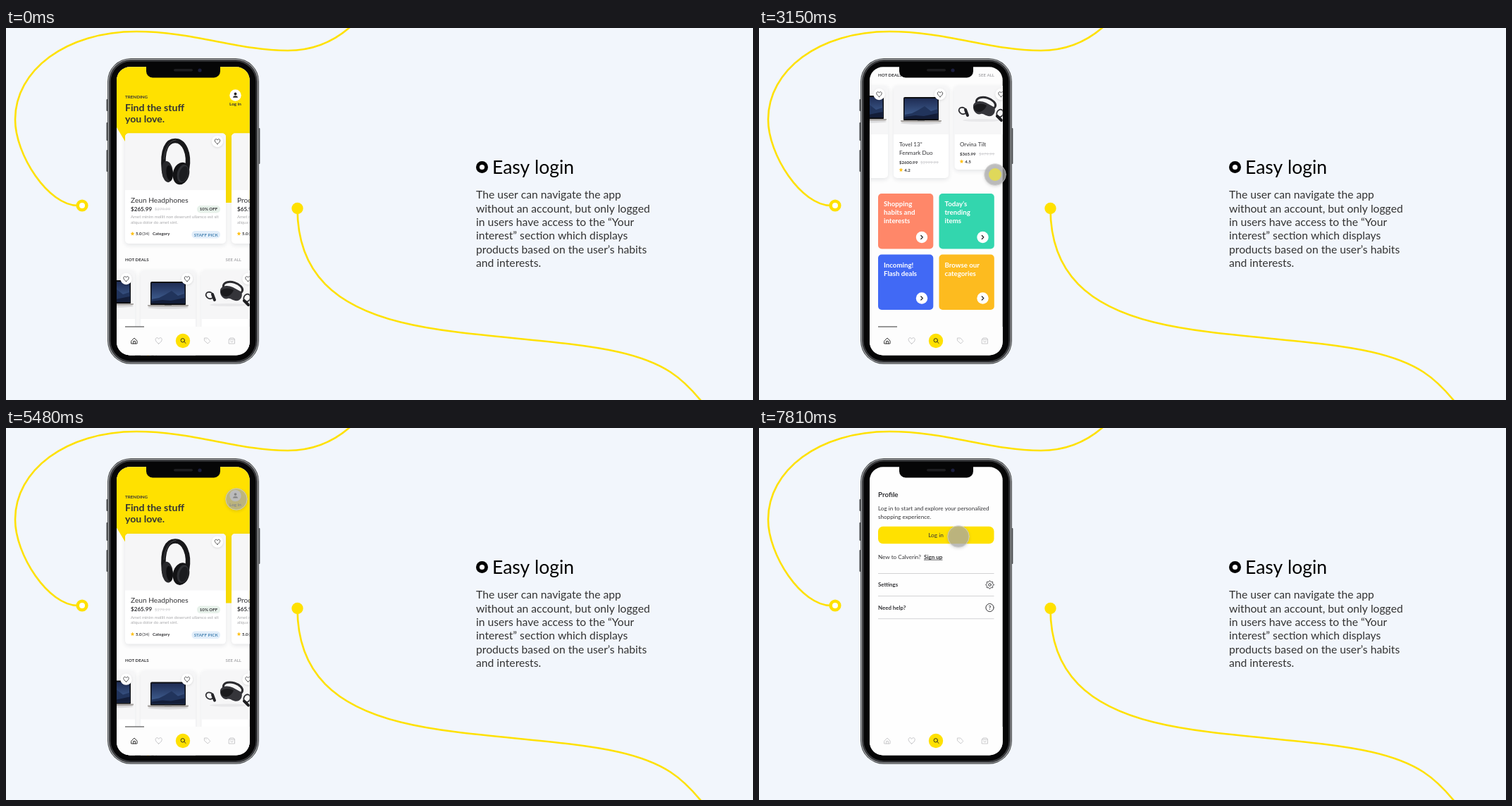
Write an HTML page with a canvas that moves like this. It is 1060 px wide and 528 px high and loops after 8000 ms.

```html
<!DOCTYPE html>
<html lang="en">
<head>
<meta charset="utf-8">
<title>Easy login</title>
<style>
  html, body { margin: 0; width: 1060px; height: 528px; overflow: hidden; background: #f2f6fc; }
  canvas { display: block; width: 1060px; height: 528px; }
</style>
</head>
<body>
<canvas id="stage"></canvas>
<script>
const canvas = document.getElementById('stage');
const ctx = canvas.getContext('2d');
const ratio = window.devicePixelRatio || 1;
canvas.width = 1060 * ratio;
canvas.height = 528 * ratio;

const LOOP = 8000, STEP = 77.5, FIRST_STEP = 830;
const SCROLL_END = 262;
const YELLOW = '#ffe100', INK = '#333336', GREY = '#a9a9ac';

const ICONS = {
  home: 'M-4 0L0-4L4 0V4H-4ZM-1.4 4V.5H1.4V4',
  heart: 'M0 3.8C-6.5-.5-4-4.4-1.8-3.9C-.7-3.7 0-2.6 0-2.3C0-2.6 .7-3.7 1.8-3.9C4-4.4 6.5-.5 0 3.8Z',
  tag: 'M-4-4H0L4 .5L.5 4L-4 0ZM-2-2h.2',
  bag: 'M-4-2L-2.5-4H2.5L4-2V4H-4ZM-4-2H4M-1.7 0A1.7 1.7 0 0 0 1.7 0',
  search: 'M2-.7A2.7 2.7 0 1 1-3.4-.7A2.7 2.7 0 1 1 2-.7M1.3 1.2L3.6 3.5',
  chevron: 'M-1.2-2.5L1.3 0L-1.2 2.5'
};

// ---------- helpers ----------
const clamp = v => Math.min(1, Math.max(0, v));
const lerp = (a, b, p) => a + (b - a) * p;
const inOut = p => p < 0.5 ? 4 * p ** 3 : 1 - 4 * (1 - p) ** 3;
const out = p => 1 - (1 - p) ** 3;
const progress = (t, from, to) => clamp((t - from) / (to - from));

function text(str, x, y, size, color = INK, weight = 400, align = 'left') {
  ctx.font = `${weight} ${size}px Lato, sans-serif`;
  ctx.fillStyle = color;
  ctx.textAlign = align;
  ctx.fillText(str, x, y);
  return ctx.measureText(str).width;
}
const bold = (str, x, y, size, color, align) => text(str, x, y, size, color, 700, align);

function struck(str, x, y, size) {
  const width = text(str, x, y, size, '#cfcfd2');
  box(x, y - size * 0.36, width, 0.6, 0, '#cfcfd2');
}
function box(x, y, w, h, r, fill) {
  ctx.beginPath();
  ctx.roundRect(x, y, w, h, r);
  ctx.fillStyle = fill;
  ctx.fill();
}
function oval(x, y, rx, ry, turn, fill) {
  ctx.beginPath();
  ctx.ellipse(x, y, rx, ry, turn, 0, Math.PI * 2);
  ctx.fillStyle = fill;
  ctx.fill();
}
const disc = (x, y, r, fill) => oval(x, y, r, r, 0, fill);
function ring(x, y, rx, ry, turn, color, width) {
  ctx.beginPath();
  ctx.ellipse(x, y, rx, ry, turn, 0, Math.PI * 2);
  ctx.strokeStyle = color;
  ctx.lineWidth = width;
  ctx.stroke();
}
function line(path, color, width) {
  ctx.strokeStyle = color;
  ctx.lineWidth = width;
  ctx.stroke(new Path2D(path));
}
function shape(path, fill) {
  ctx.fillStyle = fill;
  ctx.fill(new Path2D(path));
}
function icon(name, x, y, color, scale = 1, width = 0.9) {
  ctx.save();
  ctx.translate(x, y);
  ctx.scale(scale, scale);
  line(ICONS[name], color, width);
  ctx.restore();
}
function withShadow(blur, dy, color, draw) {
  ctx.save();
  ctx.shadowBlur = blur * ratio;
  ctx.shadowOffsetY = dy * ratio;
  ctx.shadowColor = color;
  draw();
  ctx.restore();
}
function star(x, y) {
  ctx.beginPath();
  for (let i = 0; i < 10; i++) {
    const a = i * Math.PI / 5 - Math.PI / 2, r = i % 2 ? 1.4 : 3;
    ctx.lineTo(x + r * Math.cos(a), y + r * Math.sin(a));
  }
  ctx.fillStyle = '#ffc21a';
  ctx.fill();
}
function card(x, y, w, h, imageHeight) {
  withShadow(6, 2, 'rgba(30,40,60,.12)', () => box(x, y, w, h, 5, '#fff'));
  box(x, y, w, imageHeight, [5, 5, 0, 0], '#f6f6f7');
}
function likeButton(x, y) {
  withShadow(3, 1, 'rgba(0,0,0,.12)', () => disc(x, y, 8.2, '#fff'));
  icon('heart', x, y + 0.2, INK, 0.9);
}

// ---------- stage ----------
function drawBackdrop() {
  ctx.fillStyle = '#f2f6fc';
  ctx.fillRect(0, 0, 1060, 528);
  line('M489-2C462 22 430 32 400 32C330 32 265 5 185 5C85 5 13 60 13 130C13 180 60 252 102 252', YELLOW, 2.6);
  disc(108, 252, 8.6, YELLOW);
  disc(108, 252, 4, '#fff');
  line('M413.5 256C413.5 350 470 395 560 417.5C650 440 780 440 870 460C935 475 960 497 987 530', YELLOW, 2.6);
  disc(413.5, 256, 8.2, YELLOW);

  disc(675.5, 197.5, 8.5, '#000');
  disc(675.5, 197.5, 3.6, '#fff');
  text('Easy login', 690, 206.5, 26.5, '#000');
  ['The user can navigate the app', 'without an account, but only logged',
   'in users have access to the “Your', 'interest” section which displays',
   'products based on the user’s habits', 'and interests.'
  ].forEach((row, i) => text(row, 667, 242.3 + i * 19.3, 15.7, '#333'));
}

function drawPhone() {
  [[101, 17], [134, 26], [173, 31]].forEach(([y, h]) => box(142.4, y, 2, h, 1, '#55575a'));
  box(358.6, 142, 1.8, 51, 1, '#55575a');
  const rings = [[0, '#454749'], [1, '#b0b2b4'], [2, '#3a3b3e'], [4.6, '#060607']];
  rings.forEach(([d, color]) => box(144 + d, 43 + d, 215 - 2 * d, 434 - 2 * d, 33 - d, color));
}

function drawNotch() {
  box(199, 50, 105, 20.5, [0, 0, 9, 9], '#060607');
  box(238, 58, 27, 3.6, 1.8, '#1d1d20');
  disc(275, 60, 2.6, '#1b1d3c');
}

// ---------- product pictures ----------
function headphones() {
  line('M224 202C221 172 229 160 240 160C253 160 261 178 257 200', '#18181a', 6.5);
  line('M224 186C226 169 232 160 241 159', '#4b4c50', 0.9);
  oval(229, 204, 8, 15, -0.12, '#29292c');
  oval(232, 206, 4.5, 11, -0.12, '#0f0f11');
  oval(248.5, 206.5, 11.5, 16, 0.25, '#141416');
  oval(251, 206.5, 8, 13, 0.25, '#2f3034');
  oval(252, 207, 6, 11, 0.25, '#1b1c1f');
}

function laptop(x, y) {
  oval(x, y + 19, 29, 1.8, 0, '#dcdcde');
  box(x - 25, y - 18, 50, 34, 2, '#0d0e12');
  const sky = ctx.createLinearGradient(0, y - 16, 0, y + 14);
  sky.addColorStop(0, '#1f2d55');
  sky.addColorStop(1, '#46689c');
  box(x - 23.5, y - 16, 47, 29, 0, sky);
  ctx.save();
  ctx.translate(x, y);
  shape('M-23.5 13V7L-13 5L-5 1L5-5L14 2L23.5-1V13Z', '#21345c');
  shape('M-23.5 13V10L-8 8L4 9L23.5 5V13Z', '#131d38');
  ctx.restore();
  box(x - 29, y + 15, 58, 2.6, [0, 0, 2, 2], '#a9a5a2');
  box(x - 5, y + 15, 10, 1, 0, '#777');
}

function headset() {
  oval(316, 393, 27, 2, 0, '#e8e8ea');
  ring(322, 369, 14, 8, 0.3, '#2b2b2f', 3);
  shape('M304 372C305 366 314 364 322 368L333 374C337 378 334 386 329 387C322 388 319 383 315 384C309 386 303 380 304 372Z', '#35353a');
  shape('M305 373C310 368 319 369 323 372C321 378 315 382 311 381C306 380 304 377 305 373Z', '#1a1a1d');
  ring(289, 379.5, 5.5, 4.5, 0.5, '#303034', 1.8);
  line('M293 378L296 386', '#242428', 4);
  ring(342, 383, 4.5, 5.5, 0.4, '#303034', 1.8);
  line('M338 387L344 393', '#1d1d20', 4);
}

// ---------- home screen ----------
function productCard(x, title, price, oldPrice) {
  card(x, 149.5, 143, 156.5, 80.5);
  const left = x + 8;
  text(title, left, 247.5, 10.2);
  bold(price, left, 259.5, 8.1);
  struck(oldPrice, left + 34, 259, 6);
  text('Amet minim mollit non deserunt ullamco est sit', left, 270, 6.05, GREY);
  text('aliqua dolor do amet sint.', left, 277.5, 6.05, GREY);
  star(left + 2.5, 292);
  bold('5.0', left + 7, 294.2, 6);
  text('(34)', left + 16.2, 294.2, 6);
  bold('Category', left + 31, 294.2, 6);
  box(x + 102, 252, 33, 10.5, 5, '#e7f1ea');
  bold('10% OFF', x + 118.5, 259.3, 6.1, INK, 'center');
  box(x + 94.5, 288, 40.5, 10.5, 5, '#e2eefa');
  bold('STAFF PICK', x + 114.7, 295.5, 6.3, '#4a86b4', 'center');
}

function dealText(x, y, price, oldPrice, rating) {
  bold(price, x, y, 6.1);
  struck(oldPrice, x + (price.length > 7 ? 30 : 27), y, 6);
  star(x + 2.5, y + 9);
  bold(rating, x + 7.2, y + 11.3, 6.1);
}

function tile(x, y, color, rows) {
  box(x, y, 78.3, 78.5, 5, color);
  rows.forEach((row, i) => bold(row, x + 8, y + 18 + i * 12, 9.7, '#fff'));
  disc(x + 62, y + 62, 8.2, '#fff');
  icon('chevron', x + 62, y + 62, '#222', 1, 1.2);
}

function drawHome(scroll) {
  ctx.fillStyle = '#fdfdfd';
  ctx.fillRect(150, 50, 200, 420);
  ctx.save();
  ctx.translate(0, -scroll);
  shape('M150 40H350V248H221L157 141L150 129Z', YELLOW);
  bold('TRENDING', 169, 99.7, 6.25);
  bold('Find the stuff', 169, 117.8, 14.1);
  bold('you love.', 169, 133.8, 14.1);
  disc(325.5, 95.5, 8.2, '#fff');
  disc(325.5, 93.5, 1.9, '#222');
  shape('M322 98.8C322 95.5 329 95.5 329 98.8Z', '#222');
  bold('Log in', 325.5, 110, 6.4, INK, 'center');

  productCard(169, 'Zeun Headphones', '$265.99', '$279.99');
  headphones();
  likeButton(300, 161);
  productCard(320, 'Product name', '$65.99', '$79.99');

  bold('HOT DEALS', 169, 331.3, 6.1);
  bold('SEE ALL', 334, 331.3, 6.1, GREY, 'right');
  card(105, 344, 78, 131, 69);
  laptop(152, 376);
  likeButton(170.5, 356);
  card(191, 344, 78, 131, 69);
  laptop(230, 378);
  likeButton(257, 356);
  text('Tovel 13”', 199, 430, 8);
  text('Fenmark Duo', 199, 442, 8);
  dealText(199, 454.5, '$2600.99', '$2999.99', '4.2');
  card(277.5, 344, 78, 119, 69);
  headset();
  likeButton(343.5, 356);
  text('Orvina Tilt', 285, 430, 8);
  dealText(285, 442.5, '$365.99', '$479.99', '4.5');

  tile(169, 497, '#ff8769', ['Shopping', 'habits and', 'interests']);
  tile(255.5, 497, '#33d6ae', ['Today’s', 'trending', 'items']);
  tile(169, 583.5, '#4169f5', ['Incoming!', 'Flash deals']);
  tile(255.5, 583.5, '#fdbb1f', ['Browse our', 'categories']);
  ctx.restore();
  drawNav('#222', '#fdfdfd');
  box(169, 423.4, 27, 1.2, 0, '#333');
}

function drawNav(homeColor, background) {
  ctx.fillStyle = background;
  ctx.fillRect(150, 424, 200, 46);
  icon('home', 182, 444, homeColor);
  icon('heart', 216.7, 444, '#c4c4c7', 1.1);
  disc(251, 444, 10.2, YELLOW);
  icon('search', 251.5, 444, '#222');
  icon('tag', 285.8, 444, '#c4c4c7');
  icon('bag', 320.5, 444, '#c4c4c7');
}

// ---------- profile screen ----------
function gear(x, y) {
  ctx.beginPath();
  for (let i = 0; i < 64; i++) {
    const a = i * Math.PI / 32, r = 5 + 0.75 * Math.cos(8 * a);
    ctx.lineTo(x + r * Math.cos(a), y + r * Math.sin(a));
  }
  ctx.closePath();
  ctx.strokeStyle = INK;
  ctx.lineWidth = 1;
  ctx.stroke();
  ring(x, y, 1.8, 1.8, 0, INK, 1);
}

function drawProfile() {
  ctx.fillStyle = '#fefefe';
  ctx.fillRect(150, 50, 200, 420);
  bold('Profile', 169, 97.5, 9.8);
  text('Log in to start and explore your personalized', 169, 116.7, 8.1);
  text('shopping experience.', 169, 128.8, 8.1);
  box(169, 139.8, 164.5, 24.4, 7, YELLOW);
  text('Log in', 251, 155, 8.3, INK, 400, 'center');
  text('New to Calverin?', 169, 185.5, 8.1);
  const width = bold('Sign up', 234, 185.5, 8.1);
  box(234, 186.8, width, 0.7, 0, INK);
  [206, 238, 270.3].forEach(y => box(169, y, 164.5, 0.9, 0, '#d2d2d4'));
  bold('Settings', 169, 225.3, 7.9);
  bold('Need help?', 169, 257.5, 7.9);
  gear(327.5, 222.5);
  ring(327.5, 255, 5.6, 5.6, 0, INK, 1);
  bold('?', 327.5, 257.8, 7.5, INK, 'center');
  drawNav('#c4c4c7', '#fefefe');
}

// ---------- motion ----------
function scrollAt(t) {
  return t < 3000
    ? SCROLL_END * inOut(progress(t, 1193, 1972))
    : lerp(SCROLL_END, -0.6, inOut(progress(t, 3140, 3927)));
}

// start, end, from x, y, to x, y, easing
const MOVES = [
  [800, 1060, 378, 383, 308, 398, out],
  [1990, 2440, 308, 136, 380, 232, inOut],
  [2620, 2920, 380, 196, 335, 208, out],
  [3960, 4310, 335, 470, 380, 450, inOut],
  [4500, 4930, 380, 195, 361, 121, inOut],
  [5060, 5420, 361, 121, 327, 101, inOut],
  [5480, 5700, 327, 101, 327, 96, inOut],
  [6840, 7260, 327, 96, 283, 154, inOut]
];
const PRESSES = [[1190, 1985], [3130, 3940], [5560, 5720], [7575, 7730]];

function touchAt(t) {
  const move = MOVES.filter(m => t >= m[0]).pop();
  if (!move) return null;
  const [from, to, x0, y0, x1, y1, ease] = move;
  const p = ease(progress(t, from, to));
  let y = lerp(y0, y1, p);
  if (t < 1990) y -= scrollAt(t);
  else if (t >= 2920 && t < 3960) y += SCROLL_END - scrollAt(t);
  return { x: lerp(x0, x1, p), y };
}

function drawTouch(t) {
  const touch = touchAt(t);
  if (!touch) return;
  ctx.save();
  ctx.beginPath();
  ctx.rect(143, 43, 217.5, 441);
  ctx.clip();
  withShadow(4, 1.5, 'rgba(0,0,0,.18)', () => disc(touch.x, touch.y, 15.5, 'rgba(174,174,174,.72)'));
  ring(touch.x, touch.y, 15.3, 15.3, 0, 'rgba(225,225,225,.6)', 0.9);
  if (PRESSES.some(([a, b]) => t >= a && t < b)) disc(touch.x, touch.y, 9, 'rgba(232,224,70,.82)');
  ctx.restore();
}

function render(time) {
  const t = time < FIRST_STEP - 24 ? 0
    : FIRST_STEP + Math.floor((time - FIRST_STEP + 24) / STEP) * STEP;
  ctx.setTransform(ratio, 0, 0, ratio, 0, 0);
  ctx.lineJoin = ctx.lineCap = 'round';
  drawBackdrop();
  drawPhone();

  ctx.save();
  ctx.beginPath();
  ctx.roundRect(157, 55.3, 188.7, 409.2, 19);
  ctx.clip();
  const fade = progress(t, 5960, 6400);
  if (fade < 1) drawHome(scrollAt(t));
  if (fade > 0) {
    ctx.globalAlpha = fade;
    drawProfile();
  }
  ctx.restore();

  drawNotch();
  drawTouch(t);
}

const start = performance.now();
function tick() {
  render((performance.now() - start) % LOOP);
  requestAnimationFrame(tick);
}
tick();
</script>
</body>
</html>
```
